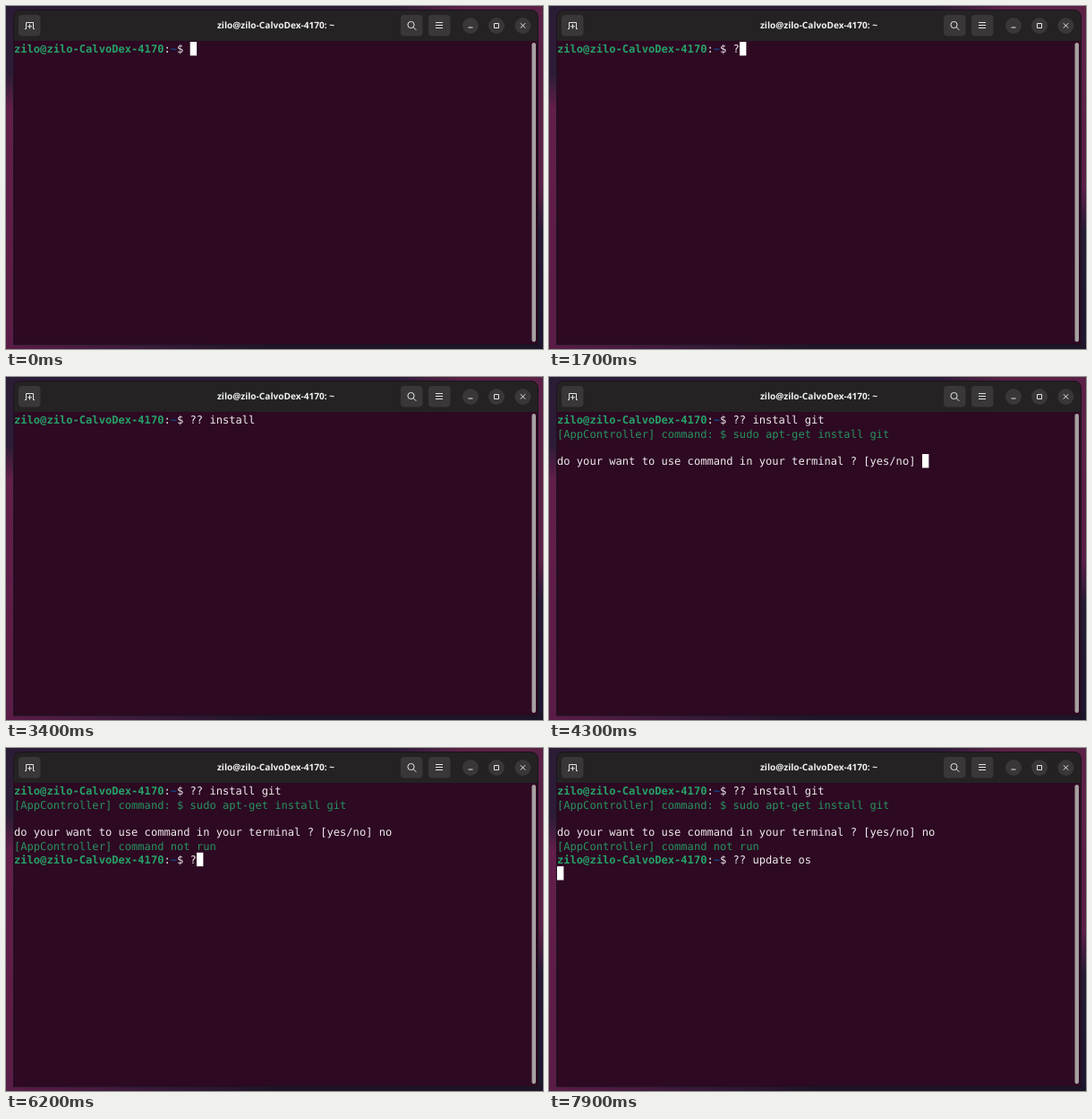
An HTML page that plays this animation: 600 px wide and 383 px high, repeating every 8 s.

```html
<!DOCTYPE html>
<html lang="en">
<head>
<meta charset="utf-8">
<title>Terminal</title>
<style>
  html, body { margin: 0; width: 100%; height: 100%; overflow: hidden; background: #20152a; }
  svg { display: block; width: 100vw; height: 100vh; }
  text { white-space: pre; text-rendering: geometricPrecision; }
  #rows { font: 12.1px "DejaVu Sans Mono", monospace; fill: #efeaed; }
  #title { font: bold 10.1px "Open Sans", "Noto Sans", sans-serif; fill: #f2f2f2; text-anchor: middle; }
  .btn { fill: #393737; }
  .icon { fill: none; stroke: #e6e6e6; stroke-width: 1; }
  .user { fill: #26a269; font-weight: bold; }
  .path { fill: #12488b; font-weight: bold; }
  .info { fill: #26945f; }
</style>
</head>
<body>
<svg viewBox="0 0 600 383" preserveAspectRatio="none">
  <defs>
    <linearGradient id="left" x2="0" y2="1">
      <stop offset="0" stop-color="#2b1c36"/>
      <stop offset=".2" stop-color="#2d1c37"/>
      <stop offset=".3" stop-color="#621f4a"/>
      <stop offset="1" stop-color="#5a1c46"/>
    </linearGradient>
    <linearGradient id="right" x2="0" y2="1">
      <stop offset="0" stop-color="#5c2146"/>
      <stop offset=".53" stop-color="#5c1f47"/>
      <stop offset=".66" stop-color="#241a34"/>
      <stop offset="1" stop-color="#1d1730"/>
    </linearGradient>
    <linearGradient id="top">
      <stop offset=".72" stop-color="#2b1c36"/>
      <stop offset=".85" stop-color="#5c2146"/>
    </linearGradient>
    <linearGradient id="bottom">
      <stop offset="0" stop-color="#5a1c46"/>
      <stop offset=".25" stop-color="#3a1a3a"/>
      <stop offset=".5" stop-color="#1e1528"/>
      <stop offset="1" stop-color="#1d1528"/>
    </linearGradient>
  </defs>
  <rect width="600" height="20" fill="url(#top)"/>
  <rect width="10" height="383" fill="url(#left)"/>
  <rect x="590" width="10" height="383" fill="url(#right)"/>
  <rect y="376" width="600" height="7" fill="url(#bottom)"/>

  <path d="M8.5 378V13q0-8.5 8.5-8.5H586q8.5 0 8.5 8.5V378Z" fill="#2d0922" stroke="#1c1220"/>
  <path d="M9 39V13q0-8 8-8H586q8 0 8 8V39Z" fill="#242222"/>
  <rect x="587.5" y="41" width="4.5" height="334" rx="2.2" fill="#a7a09f"/>

  <g class="btn">
    <rect x="14" y="10" width="24.5" height="23.5" rx="4"/>
    <rect x="441" y="10" width="24.5" height="23.5" rx="4"/>
    <rect x="472" y="10" width="24.5" height="23.5" rx="4"/>
    <circle cx="519" cy="22" r="9"/>
    <circle cx="548" cy="22" r="9"/>
    <circle cx="577.5" cy="22" r="9"/>
  </g>
  <g class="icon">
    <path d="M21 25.5H22.5V18.5H30.5V25.5H32M26.5 20.3V25.3M24 22.8H29"/>
    <circle cx="452.5" cy="21" r="3.6"/>
    <path d="M455 23.5L458.3 26.8M480 18.5H488M480 21.5H488M480 24.5H488"/>
    <path d="M516.5 24H521.5M545.5 19.5H550.5V24.5H545.5ZM574.8 19.2L580.2 24.6M580.2 19.2L574.8 24.6"/>
  </g>
  <text id="title" x="301.5" y="25.2"></text>
  <g id="rows"></g>
  <rect id="cursor" width="7.4" height="15.4" fill="#fff"/>
</svg>
<script>
const LOOP = 8000, CELL = 7.285, LINE = 15.35, LEFT = 9, TOP = 40;
const USER = "zilo@zilo-CalvoDex-4170", PROMPT = USER + ":~$ ";
const $ = id => document.getElementById(id);

// [time, text appended to the terminal]
const steps = [[0, PROMPT]];
const print = (time, text) => steps.push([time, text]);
const type = (time, gap, text) => [...text].forEach((c, i) => print(time + i * gap, c));

type(1600, 200, "??");
print(1900, " ");
type(2200, 100, "install");
type(3600, 100, " git");
print(4100, "\n");
print(4300, "[AppController] command: $ sudo apt-get install git\n\n" +
  "do your want to use command in your terminal ? [yes/no] ");
type(5300, 100, "no");
print(5600, "\n");
print(5700, "[AppController] command not run\n" + PROMPT);
type(6200, 100, "??");
type(6500, 100, " up");
print(7300, "d");
print(7400, "at");
print(7500, "e ");
type(7600, 100, "os");
print(7900, "\n");

// spans in which the cursor is blinked off
const hidden = [[500, 1100], [3400, 3600], [5000, 5300], [7100, 7300]];

const span = (cls, text) => `<tspan class="${cls}">${text}</tspan>`;

function style(line) {
  if (line.startsWith(PROMPT))
    return span("user", USER) + ":" + span("path", "~") + line.slice(USER.length + 2);
  return line.startsWith("[") ? span("info", line) : line;
}

let shown;
function draw(t) {
  const screen = steps.filter(s => s[0] <= t).map(s => s[1]).join("");
  $("cursor").style.opacity = hidden.some(([a, b]) => t >= a && t < b) ? 0 : 1;
  if (screen === shown) return;
  shown = screen;
  const lines = screen.split("\n"), last = lines.length - 1;
  $("rows").innerHTML = lines.map((line, i) =>
    `<text x="${LEFT}" y="${TOP + 12.2 + i * LINE}">${style(line)}</text>`).join("");
  $("cursor").setAttribute("x", LEFT + lines[last].length * CELL);
  $("cursor").setAttribute("y", TOP + last * LINE);
}

$("title").textContent = USER + ": ~";
const start = performance.now();
function frame() {
  draw((performance.now() - start) % LOOP);
  requestAnimationFrame(frame);
}
frame();
</script>
</body>
</html>
```
